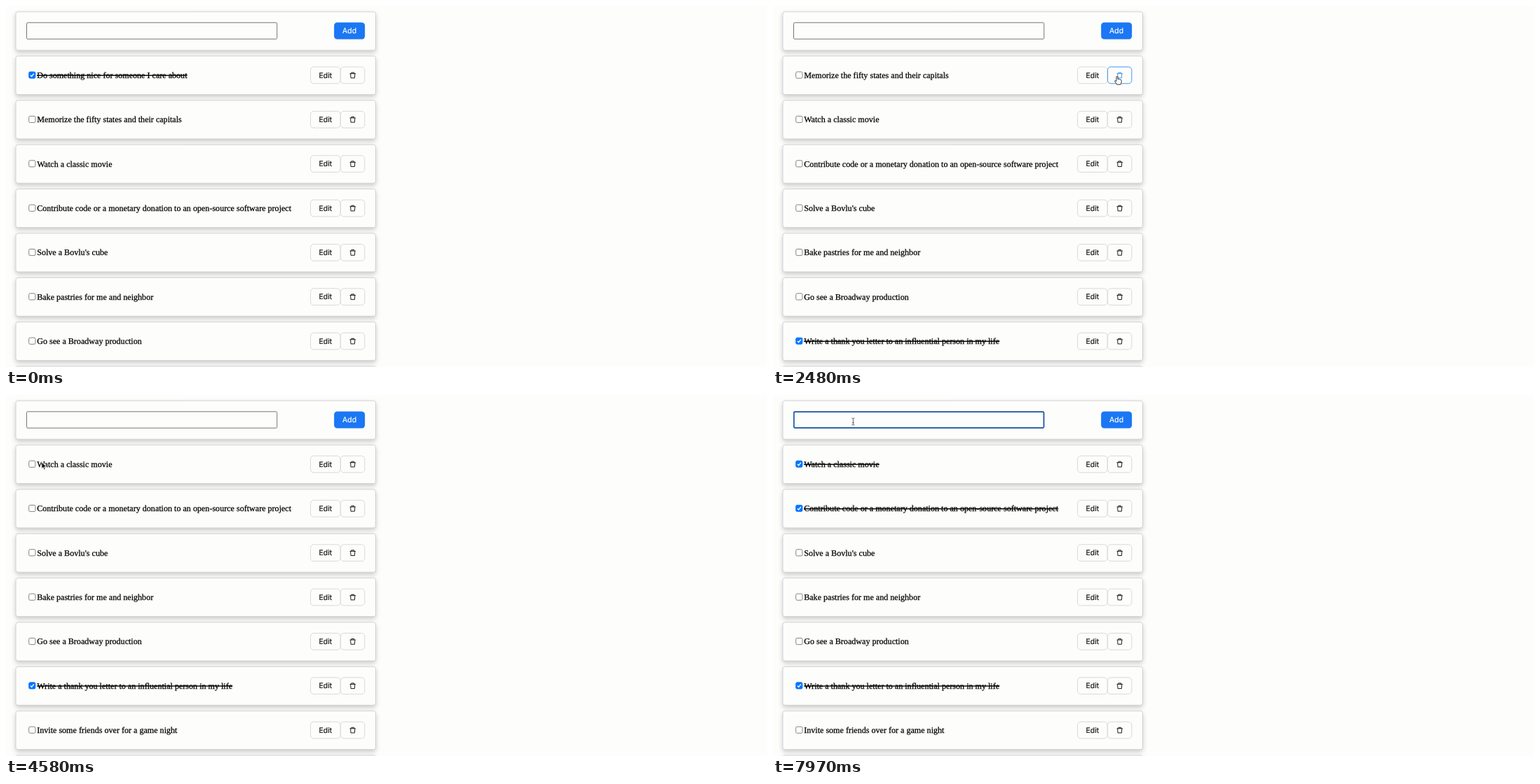
An HTML page that plays this animation: 1086x516 px, repeating every 8 s.

```html
<!DOCTYPE html>
<html lang="en">
<head>
<meta charset="utf-8">
<title>Todo list</title>
<style>
  html, body { margin: 0; width: 100%; height: 100%; overflow: hidden; background: #fdfdfc; }
  svg { display: block; width: 1086px; height: 516px; cursor: default; }
  text { text-rendering: geometricPrecision; white-space: pre; user-select: none; }
  .card { fill: #fdfdfc; stroke: #d0d0d6; stroke-width: .9; filter: drop-shadow(0 3px 3px rgba(0, 0, 0, .2)); }
  .label { font: 12.08px "Liberation Serif", "Times New Roman", serif; fill: #000; stroke: #000; stroke-width: .25; }
  .done { text-decoration: line-through; }
  .btn { font: 10.57px Inter, Roboto, sans-serif; text-anchor: middle; stroke-width: .2; }
  .field { fill: #fdfdfc; stroke: #767676; }
  .ring { fill: none; stroke: #1f60aa; stroke-width: 1.7; }
  .bin { fill: none; stroke-width: 1; }
</style>
</head>
<body>
<svg id="stage" viewBox="0 0 1086 516"></svg>
<script>
const LOOP = 8000, PITCH = 63.35, SLOTS = 8;
const TASKS = [
  "Do something nice for someone I care about",
  "Memorize the fifty states and their capitals",
  "Watch a classic movie",
  "Contribute code or a monetary donation to an open-source software project",
  "Solve a Bovlu's cube",
  "Bake pastries for me and neighbor",
  "Go see a Broadway production",
  "Write a thank you letter to an influential person in my life",
  "Invite some friends over for a game night",
  ""
];
const CHECKED_AT = { 0: 0, 7: 0, 2: 5050, 3: 6250 };
const DELETES = [2480, 3470];
const PRESS = 110, FOCUS_AT = 7780;

// Pointer path: time, x, y
const PATH = [
  [220, 562, 530], [640, 522, 300], [820, 522, 300], [1300, 456, 106],
  [1380, 458, 103], [1460, 483, 99], [1620, 491, 100.4], [3620, 491, 100.4],
  [4300, 56, 97], [4450, 56, 97], [4800, 40, 94], [5600, 40, 94],
  [6050, 42, 153], [6750, 42, 153], [7500, 114.4, 38], [LOOP, 114.4, 38]
];

const stage = document.getElementById("stage");

function add(parent, tag, attrs, text) {
  const el = document.createElementNS("http://www.w3.org/2000/svg", tag);
  for (const key in attrs) el.setAttribute(key, attrs[key]);
  if (text) el.textContent = text;
  parent.appendChild(el);
  return el;
}
const group = (parent, x, y) => add(parent, "g", { transform: `translate(${x} ${y})` });
const rect = (parent, x, y, width, height, rx, more) =>
  add(parent, "rect", { x, y, width, height, rx, ...more });
const card = y => {
  const g = group(stage, 0, y);
  rect(g, 14, 0.2, 513.5, 55, 3, { class: "card" });
  return g;
};

const head = card(8);
rect(head, 29.5, 15.8, 357.3, 23.4, 1.5, { class: "field" });
const ring = rect(head, 29.9, 16.2, 356.5, 22.6, 1.2, { class: "ring" });
rect(head, 468.2, 15.4, 44, 24.2, 4.5, { fill: "#1b77f4" });
add(head, "text", { x: 490.2, y: 31.3, class: "btn", fill: "#fff", stroke: "#fff" }, "Add");

const slots = Array.from({ length: SLOTS }, (_, i) => {
  const g = card(8 + PITCH * (i + 1));
  const box = rect(g, 32.7, 22.7, 9.2, 9.2, 1.8, {});
  const tick = add(g, "path", { d: "M34.9 27.5l1.7 1.8 3.2-4", fill: "none", stroke: "#fff", "stroke-width": 1.4 });
  const label = add(g, "text", { x: 44.2, y: 31.6, class: "label" });
  const editBox = rect(g, 434.6, 15.7, 42.5, 23.8, 4.5, { fill: "#fdfdfc" });
  const editText = add(g, "text", { x: 455.9, y: 31.3, class: "btn" }, "Edit");
  const binBox = rect(g, 477.6, 15.7, 34.3, 23.8, 4.5, { fill: "#fdfdfc" });
  const bin = add(group(g, 494.8, 27.6), "path", {
    class: "bin", d: "M-1.9-2.4V-3.8H1.9V-2.4M-4.2-2.3H4.2M-3.1-2L-2.7 3.9H2.7L3.1-2"
  });
  return { box, tick, label, editBox, editText, binBox, bin };
});

const pointer = add(stage, "g", {});
const shapes = {
  arrow: add(pointer, "path", {
    d: "M0 0V9.2L2.1 7.3 3.6 10.8 5.2 10.1 3.7 6.7H6.6Z",
    fill: "#111", stroke: "#fff", "stroke-width": .7
  }),
  hand: add(pointer, "path", {
    d: "M-1 .8Q0-.5 1 .8V4.2Q2 3.4 2.9 4.4 4 3.8 4.7 4.9 6 4.6 6.2 6V8.4Q6 10 5 11.8H-.2Q-1.6 9.6-3.2 7.4-3.4 6-2 6.2L-1 7.2Z",
    fill: "#fff", stroke: "#222", "stroke-width": .9
  }),
  beam: add(pointer, "path", {
    d: "M-2-5Q0-5 0-3.6Q0-5 2-5M0-3.8V3.8M-2 5Q0 5 0 3.6Q0 5 2 5M-1.2 1.6H1.2",
    fill: "none", stroke: "#555", "stroke-width": .9
  })
};

function pointerAt(t) {
  if (t < PATH[0][0]) return null;
  const i = PATH.findIndex(p => p[0] > t);
  const [t0, x0, y0] = PATH[i - 1], [t1, x1, y1] = PATH[i];
  const u = (t - t0) / (t1 - t0), s = u * u * (3 - 2 * u);
  return [x0 + (x1 - x0) * s, y0 + (y1 - y0) * s];
}

function hit(t) {
  const p = pointerAt(t);
  if (!p) return "";
  const [x, y] = p;
  const row = Math.floor((y - 8) / PITCH), dy = y - 8 - row * PITCH - 27.5;
  if (row === 0) {
    if (x > 29 && x < 387 && Math.abs(dy) < 12) return "field";
    return x > 468 && x < 512 && Math.abs(dy) < 12 ? "add" : "";
  }
  if (Math.abs(x - 37) < 6 && Math.abs(dy) < 10) return "check" + (row - 1);
  if (Math.abs(dy) > 12 || x < 434.5 || x > 512) return "";
  return (x < 477 ? "edit" : "bin") + (row - 1);
}

// Share of the last 200 ms spent over a control, standing in for its colour transition
const hover = (recent, name) => recent.filter(n => n === name).length / recent.length;
const mix = (a, b, k) => `rgb(${a.map((v, i) => Math.round(v + (b[i] - v) * k))})`;
const INK = [25, 25, 25], LINE = [217, 217, 217], BLUE = [64, 150, 240], DEEP = [27, 94, 200];

function set(el, attrs) {
  for (const key in attrs) el.setAttribute(key, attrs[key]);
}
const show = (el, on) => set(el, { visibility: on ? "visible" : "hidden" });

function render(t) {
  const now = hit(t);
  const recent = Array.from({ length: 20 }, (_, i) => hit(t - i * 10));
  const gone = DELETES.filter(d => t >= d).length;
  const pressed = DELETES.some(d => t >= d - PRESS && t < d);

  slots.forEach((s, i) => {
    const id = i + gone;
    const done = t >= (CHECKED_AT[id] ?? Infinity);
    const over = now === "check" + i;
    const accent = over ? "#005cc8" : "#0075ff";
    set(s.box, {
      fill: done ? accent : "#fff",
      stroke: done ? accent : over ? "#4f4f4f" : "#767676",
      "stroke-width": .9
    });
    show(s.tick, done);
    if (s.label.textContent !== TASKS[id]) s.label.textContent = TASKS[id];
    set(s.label, { class: done ? "label done" : "label" });

    const e = hover(recent, "edit" + i), b = hover(recent, "bin" + i);
    const tint = pressed && now === "bin" + i ? DEEP : BLUE;
    const ink = mix(INK, BLUE, e);
    set(s.editBox, { stroke: mix(LINE, BLUE, e) });
    set(s.editText, { fill: ink, stroke: ink });
    set(s.binBox, { stroke: mix(LINE, tint, b) });
    set(s.bin, { stroke: mix(INK, tint, b) });
  });

  show(ring, t >= FOCUS_AT);

  const p = pointerAt(t);
  const kind = !p ? "" : now === "field" ? "beam" : /^(edit|bin|add)/.test(now) ? "hand" : "arrow";
  for (const name in shapes) show(shapes[name], name === kind);
  if (p) set(pointer, { transform: `translate(${p[0].toFixed(2)} ${p[1].toFixed(2)})` });
}

const start = performance.now();
function tick() {
  render((performance.now() - start) % LOOP);
  requestAnimationFrame(tick);
}
tick();
</script>
</body>
</html>
```
